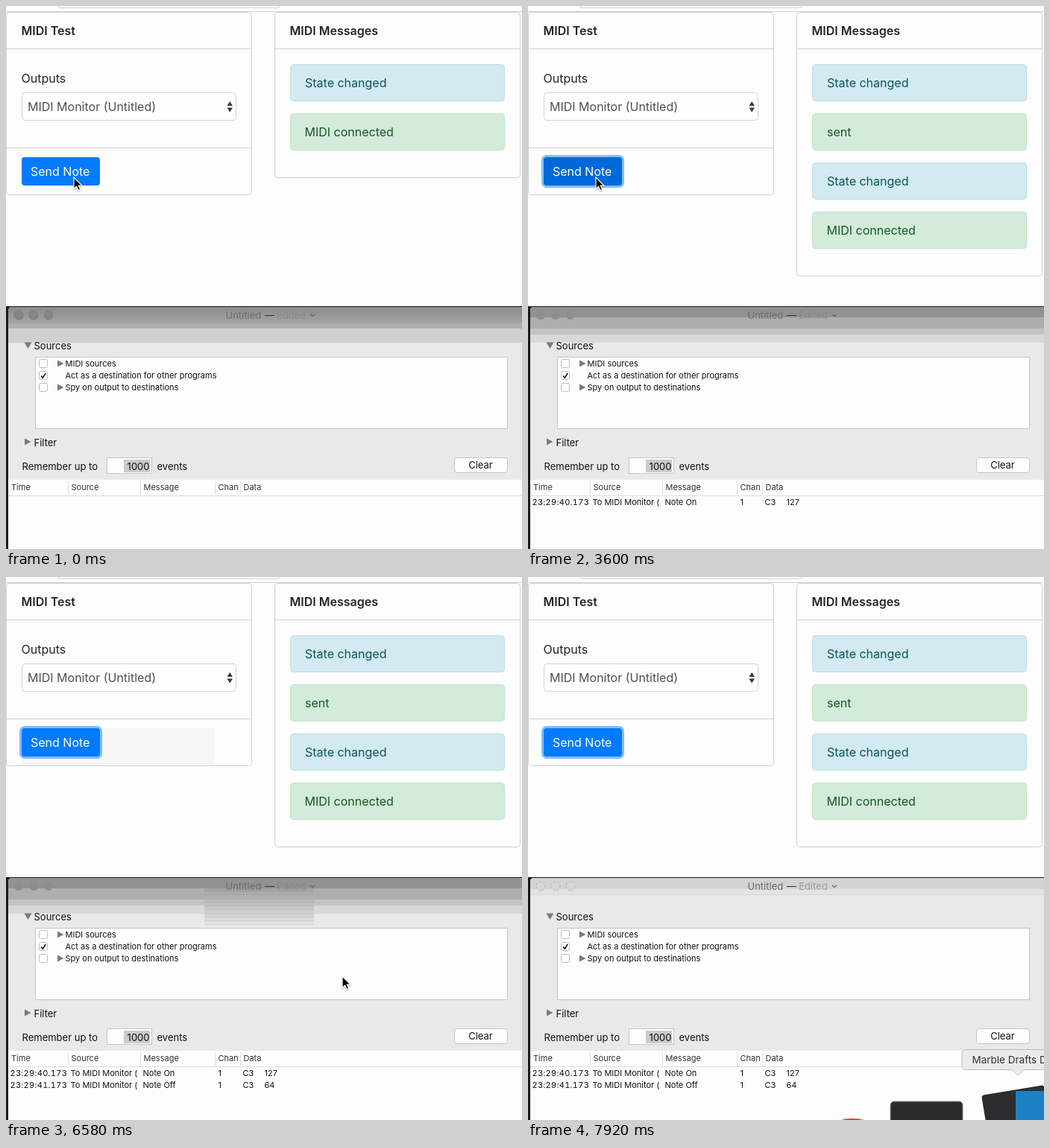
Recreate the animation shown at these times as an HTML page. Size 692 px wide and 729 px high, loop 8020 ms.

```html
<!DOCTYPE html>
<html lang="en">
<head>
<meta charset="utf-8">
<title>MIDI Test</title>
<style>
html, body { margin: 0; width: 100%; height: 100%; overflow: hidden; background: #fdfdfd; }
svg { display: block; width: 692px; height: 729px; }
text { font: 16px Inter, Roboto, sans-serif; fill: #212529; white-space: pre; }
.head { font-weight: 600; }
.mid { font-size: 13px; fill: #111; }
.small text, .small { font-size: 11px; fill: #111; }
.cols text { fill: #333; }
.time { letter-spacing: .3px; font-variant-numeric: tabular-nums; }
.card { fill: none; stroke: #d0d0d0; }
.line { stroke: #d0d0d0; }
.info { fill: #d2eaf0; stroke: #bee1e8; }
.good { fill: #d3ebd9; stroke: #c2e4cb; }
.info-text { fill: #0c5460; }
.good-text { fill: #155724; }
.tri { fill: #7b7b7b; }
.field { fill: #fdfdfd; stroke: #c6c6c6; }

/* every change is a hard cut on one shared 8020 ms clock */
.step { animation: 8020ms step-end infinite; }
.pre { animation-name: pre; }
.post { animation-name: post; }
.late { animation-name: late; }
.mid-bars { animation-name: mid-bars; }
.off { animation-name: off; }
.hover { animation-name: hover; }
.ghost { animation-name: ghost; }
.ring { animation-name: ring; }
.btn { animation-name: btn; }
.cursor { animation-name: path, cursor-off; }
.app { animation-name: app, app-on; }
.tip { animation-name: tip; }
.term { animation-name: term, term-on; }
.red { animation-name: red, red-on; }

@keyframes pre { 0% { opacity: 1 } 44.887%, to { opacity: 0 } }
@keyframes post { 0% { opacity: 0 } 44.887%, to { opacity: 1 } }
@keyframes late { 0% { opacity: 0 } 98.753%, to { opacity: 1 } }
@keyframes mid-bars { 0% { opacity: 0 } 44.887% { opacity: 1 } 98.753%, to { opacity: 0 } }
@keyframes off { 0% { opacity: 0 } 56.109%, to { opacity: 1 } }
@keyframes hover { 0% { opacity: 0 } 76.558% { opacity: 1 } 98.753%, to { opacity: 0 } }
@keyframes ghost { 0% { opacity: 0 } 80.174% { opacity: 1 } 98.753%, to { opacity: 0 } }
@keyframes btn {
  0% { fill: #037bff } 37.406% { fill: #0071ee } 39.276% { fill: #0069d9 }
  41.147% { fill: #0064d0 } 43.017% { fill: #0062cc } 44.887% { fill: #0069d9 }
  76.558%, to { fill: #037bff }
}
@keyframes ring {
  0% { stroke-width: 0 } 41.147% { stroke-width: 4px }
  43.017% { stroke-width: 8px } 44.887%, to { stroke-width: 6px }
}
@keyframes path {
  0% { transform: translate(91px, 230px) }
  72.817% { transform: translate(96px, 234px) }
  74.688% { transform: translate(224px, 345px) }
  76.558% { transform: translate(268px, 378px) }
  80.174% { transform: translate(401px, 498px) }
  82.044% { transform: translate(451px, 536px) }
  85.785%, to { transform: translate(570px, 651px) }
}
@keyframes cursor-off { 0% { opacity: 1 } 87.655%, to { opacity: 0 } }
@keyframes app {
  0% { transform: translate(573px, 649px) }
  91.271% { transform: translate(589px, 635px) }
  93.142% { transform: translate(630px, 635px) }
  95.012% { transform: translate(649px, 634px) }
  96.882%, to { transform: translate(657px, 634px) }
}
@keyframes app-on { 0% { opacity: 0 } 89.526%, to { opacity: 1 } }
@keyframes tip { 0% { opacity: 0 } 91.271%, to { opacity: 1 } }
@keyframes term {
  0% { transform: translate(466px, 712px) scale(.93) }
  95.012% { transform: translate(479px, 707px) scale(.97) }
  96.882%, to { transform: translate(486px, 704px) }
}
@keyframes term-on { 0% { opacity: 0 } 93.142%, to { opacity: 1 } }
@keyframes red {
  0% { transform: translate(437px, 773px) }
  96.882%, to { transform: translate(435px, 771.5px) }
}
@keyframes red-on { 0% { opacity: 0 } 95.012%, to { opacity: 1 } }
</style>
</head>
<body>
<svg viewBox="0 0 692 729">
  <defs>
    <rect id="alert" x="381.5" width="287" height="49" rx="4"/>
    <rect id="check" x="44.5" width="11" height="11" rx="2" fill="#fff" stroke="#bcbcbc"/>
    <path id="tri" class="tri" d="M0 0 8.5 4.5 0 9Z"/>
    <g id="dots"><circle cx="17" cy="415" r="6"/><circle cx="37" cy="415" r="6"/><circle cx="57" cy="415" r="6"/></g>
    <linearGradient id="shade" x2="0" y2="1">
      <stop stop-color="#8b8b8b"/><stop offset="1" stop-color="#a3a3a3"/>
    </linearGradient>
    <pattern id="stripes" width="147" height="5" y="1" patternUnits="userSpaceOnUse">
      <rect width="147" height="1" fill="#000" opacity=".08"/>
    </pattern>
    <linearGradient id="smear" x2="0" y2="1">
      <stop stop-color="#a2a2a2"/><stop offset=".5" stop-color="#c6c6c6"/><stop offset="1" stop-color="#e5e5e5"/>
    </linearGradient>
  </defs>

  <rect width="692" height="729" fill="#fdfdfd"/>

  <!-- web page -->
  <path class="card" d="M69.5-4V-1Q69.5 2.5 73 2.5H364Q367.5 2.5 367.5-1V-4"/>
  <path class="line" d="M0 7.5H692"/>
  <rect class="card" x=".5" y="8.5" width="329" height="245" rx="4"/>
  <path class="line" d="M1 57.5H329M1 190.5H329M361 57.5H689"/>
  <text class="head" x="20.5" y="39">MIDI Test</text>
  <text x="20.5" y="103">Outputs</text>
  <rect x="21.5" y="116.5" width="287" height="37" rx="4" fill="#fefefe" stroke="#ced4da"/>
  <text x="29" y="141" style="fill:#495057">MIDI Monitor (Untitled)</text>
  <path d="M296.5 134 300.2 128 304 134ZM296.5 136.500H304L300.2 142.500Z" fill="#343a40"/>

  <rect class="step hover" x="21" y="203" width="259" height="49" fill="#f6f6f6"/>
  <rect class="step ring" x="21" y="203" width="105" height="38" rx="4" fill="none" stroke="#80bdff" stroke-width="0"/>
  <rect class="step btn" x="21" y="203" width="105" height="38" rx="4" fill="#037bff"/>
  <text x="33" y="228" style="fill:#fff">Send Note</text>

  <text class="head" x="380.500" y="39">MIDI Messages</text>
  <use href="#alert" y="78.5" class="info"/>
  <text class="info-text" x="401" y="109">State changed</text>
  <g class="step pre">
    <rect class="card" x="360.5" y="8.5" width="329" height="222" rx="4"/>
    <use href="#alert" y="144.5" class="good"/>
    <text class="good-text" x="400.5" y="175">MIDI connected</text>
  </g>
  <g class="step post" opacity="0">
    <rect class="card" x="360.5" y="8.5" width="329" height="354" rx="4"/>
    <use href="#alert" y="144.5" class="good"/>
    <text class="good-text" x="401" y="175">sent</text>
    <use href="#alert" y="210.5" class="info"/>
    <text class="info-text" x="401" y="241">State changed</text>
    <use href="#alert" y="276.5" class="good"/>
    <text class="good-text" x="400.5" y="307">MIDI connected</text>
  </g>

  <!-- desktop window -->
  <rect y="403" width="692" height="326" fill="#1b1b1e"/>
  <path d="M3 729V409Q3 404 8 404H692V729Z" fill="#e9e9e9"/>
  <g class="step pre">
    <path d="M3 426V409Q3 404 8 404H692V426Z" fill="url(#shade)"/>
    <rect x="3" y="426" width="689" height="7" fill="#aeaeae"/>
    <rect x="3" y="433" width="689" height="19" fill="#d0d0d0"/>
    <use href="#dots" fill="#858585" stroke="#7c7c7c"/>
  </g>
  <g class="step mid-bars" opacity="0">
    <path d="M3 419V409Q3 404 8 404H692V419Z" fill="#929292"/>
    <rect x="3" y="418" width="689" height="15" fill="#aeaeae"/>
    <rect x="3" y="433" width="689" height="8" fill="#c4c4c4"/>
    <rect x="3" y="441" width="689" height="11" fill="#d8d8d8"/>
    <use href="#dots" fill="#8e8e8e"/>
  </g>
  <g class="step ghost" opacity="0">
    <rect x="266" y="418" width="147" height="49" fill="url(#smear)"/>
    <rect x="266" y="418" width="147" height="49" fill="url(#stripes)"/>
  </g>
  <g class="step late" opacity="0">
    <path d="M3 419V409Q3 404 8 404H692V419Z" fill="#d2d3d2"/>
    <rect x="3" y="419" width="689" height="7" fill="#e3e3e3"/>
    <path d="M3 426.500H692" stroke="#d6d6d6"/>
    <use href="#dots" fill="#d6d6d6" stroke="#b2b2b2" stroke-dasharray="3 2"/>
  </g>
  <text class="mid" x="294.500" y="420" style="fill:#6c6c6c">Untitled</text>
  <text class="mid" x="347" y="420" style="fill:#333">—</text>
  <text class="mid" x="363" y="420" style="fill:#808080;opacity:.65">Edited</text>
  <path d="M408 414 411 416.500 414 414" fill="none" stroke="#666" stroke-width="1.3"/>

  <path class="tri" d="M24.500 451.500H34.500L29.500 460Z"/>
  <text class="mid" x="37.500" y="460.500">Sources</text>
  <rect class="field" x="39.500" y="471.500" width="633" height="96"/>
  <use href="#check" y="474.500"/><use href="#check" y="490.500"/><use href="#check" y="506.500"/>
  <path d="M47 496.500 49.300 499.200 53.200 492.800" fill="none" stroke="#111" stroke-width="1.600"/>
  <use href="#tri" x="69" y="475.500"/><use href="#tri" x="69" y="507.500"/>
  <g class="small">
    <text x="79.500" y="484">MIDI sources</text>
    <text x="79.500" y="500">Act as a destination for other programs</text>
    <text x="79.500" y="516">Spy on output to destinations</text>
  </g>
  <use href="#tri" x="25" y="580.500"/>
  <text class="mid" x="37.500" y="590.500">Filter</text>
  <text class="mid" x="21.500" y="623">Remember up to</text>
  <rect class="field" x="135.500" y="606.500" width="60" height="21"/>
  <rect x="158" y="609" width="35" height="17" fill="#cbcbcb"/>
  <text class="mid" x="192.500" y="623" text-anchor="end">1000</text>
  <text class="mid" x="202.500" y="623">events</text>
  <rect class="field" x="601.500" y="606.500" width="71" height="20" rx="3.500"/>
  <text class="mid" x="636.500" y="621" text-anchor="middle">Clear</text>

  <rect x="3" y="636" width="689" height="93" fill="#fdfdfd"/>
  <path d="M3 657.500H692M83.500 638V656M180.500 638V656M280.500 638V656M314.500 638V656" stroke="#dedede"/>
  <g class="small cols">
    <text x="7" y="650">Time</text><text x="87.500" y="650">Source</text>
    <text x="184.500" y="650">Message</text><text x="284.500" y="650">Chan</text>
    <text x="318.500" y="650">Data</text>
  </g>
  <g class="small step post" opacity="0">
    <text class="time" x="5.500" y="670">23:29:40.173</text><text x="86.500" y="670">To MIDI Monitor (</text>
    <text x="183.500" y="670">Note On</text><text x="284.500" y="670">1</text>
    <text x="317.500" y="670">C3</text><text x="346.500" y="670">127</text>
  </g>
  <g class="small step off" opacity="0">
    <text class="time" x="5.500" y="686">23:29:41.173</text><text x="86.500" y="686">To MIDI Monitor (</text>
    <text x="183.500" y="686">Note Off</text><text x="284.500" y="686">1</text>
    <text x="317.500" y="686">C3</text><text x="346.500" y="686">64</text>
  </g>

  <!-- dock -->
  <circle class="step red" r="45" fill="#d9453a" opacity="0"/>
  <rect class="step term" width="97" height="97" rx="5" fill="#2a2b2b" stroke="#8d8d8d" opacity="0"/>
  <g class="step app" opacity="0">
    <rect width="85" height="90" rx="4" fill="#2d2d30" transform="translate(-49 62) rotate(-9.5)"/>
    <rect x="-3" y="56" width="56" height="56" fill="#1b80c4"/>
    <g class="step tip" opacity="0">
      <path d="M-70 .5H70Q75 .5 75 5V23Q75 27.500 70 27.500H8L0 35.500-8 27.500H-70Q-75 27.500-75 23V5Q-75 .5-70 .5Z" fill="#ebebeb" stroke="#bdbdbd"/>
      <text x="-61.500" y="18.500" style="font-size:13.5px;fill:#333">Marble Drafts Desk</text>
    </g>
  </g>

  <path class="step cursor" d="M0 0V15.500L3.600 12.200 6 17.600 8.700 16.400 6.300 11.200H11Z" fill="#000" stroke="#fff" stroke-width="1.200" style="filter:drop-shadow(0 1px 1px #0005)"/>
</svg>
</body>
</html>
```
